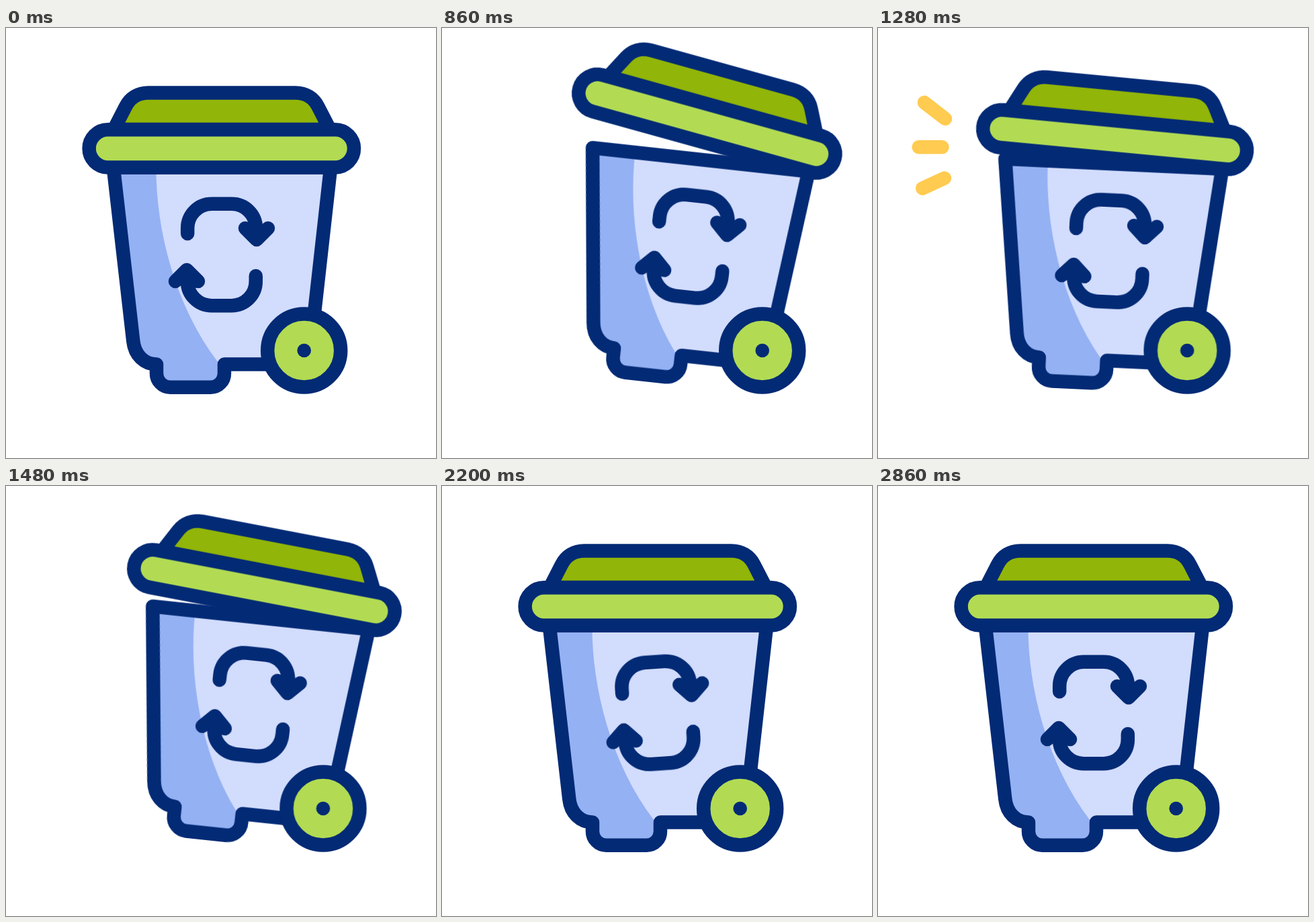
An HTML page without scripts that plays this animation: 640x640 px, repeating every 3020 ms.

```html
<!DOCTYPE html>
<html lang="en">
<head>
<meta charset="utf-8">
<title>Recycling bin</title>
<style>
  :root {
    --navy: #032a75;
    --lime: #b2db53;
    --green: #91b508;
    --pale: #d2dcfd;
    --blue: #94b1f3;
    --yellow: #ffcb50;
  }
  html, body { margin: 0; width: 100%; height: 100%; overflow: hidden; background: #fff; }
  svg { display: block; width: 100%; height: 100%; }

  .ink { stroke: var(--navy); stroke-width: 20.5; stroke-linecap: round; stroke-linejoin: round; }

  .bin, .tilt, .lid, .arrows, .spark {
    animation: 3020ms cubic-bezier(.37, 0, .63, 1) infinite;
  }
  .bin { animation-name: roll; }
  .tilt { animation-name: tilt; transform-origin: 443.7px 480px; }
  .lid { animation-name: flap; transform-origin: 484px 193px; }
  .arrows { animation-name: spin; transform-origin: 321px 337.5px; }
  .spark {
    animation-name: burst;
    stroke: var(--yellow);
    stroke-width: 20.5;
    stroke-linecap: round;
    stroke-dasharray: 1 3;
  }

  @keyframes roll {
    0%, 6.62% { transform: translateX(0); }
    18.05% { transform: translateX(-21px); }
    29.3%, 30.8% { transform: translateX(33.7px); }
    38.58% { transform: translateX(0); }
    46.36%, 47.02% { transform: translateX(33.7px); }
    54.64%, 100% { transform: translateX(0); }
  }
  @keyframes tilt {
    0%, 17.32% { transform: rotate(0deg); }
    31.82% { transform: rotate(7.1deg); }
    39.07% { transform: rotate(0deg); }
    47.02% { transform: rotate(7.1deg); }
    54.97%, 100% { transform: rotate(0deg); }
  }
  @keyframes flap {
    0%, 17.05% { transform: rotate(0deg); }
    28.97%, 30.46% { transform: rotate(9.3deg); }
    39.07% { transform: rotate(0deg); }
    46.36% { transform: rotate(6.4deg); }
    54.3%, 100% { transform: rotate(0deg); }
  }
  @keyframes spin {
    0%, 51.32% { transform: rotate(0deg); }
    95.03%, 100% { transform: rotate(360deg); }
  }
  @keyframes burst {
    0%, 39.07% { stroke-dashoffset: 1.02; }
    43.71% { stroke-dashoffset: 0; }
    48.34%, 100% { stroke-dashoffset: -1.02; }
  }
</style>
</head>
<body>
<svg viewBox="0 0 640 640" fill="none">
  <defs>
    <g id="arrow">
      <path d="M270.2 306V298A36 36 0 0 1 306.2 261.8H336A36 36 0 0 1 372 298V312"/>
      <path d="M356 298L373 315L390 298"/>
    </g>
  </defs>

  <path class="spark" pathLength="1" d="M100 135L62 105.5"/>
  <path class="spark" pathLength="1" d="M95.5 177.3H53"/>
  <path class="spark" pathLength="1" d="M99 223.5L59 242"/>

  <g class="bin">
    <g class="tilt">
      <path fill="var(--pale)" d="M159.8 207.5H483.2L455 460Q450 500.5 424 500.5H220Z"/>
      <path fill="var(--blue)" d="M223.5 207.5H159.8L189.3 466C191.5 487 206 500.5 224 500.5V514A20.5 20.5 0 0 0 244.5 534.7H304.5A20.5 20.5 0 0 0 325 514V500.5L316 498C252 415 223 300 223.5 207.5Z"/>
      <path class="ink" d="M159.8 207.5L189.3 466C191.5 487 206 500.5 224 500.5V514A20.5 20.5 0 0 0 244.5 534.7H304.5A20.5 20.5 0 0 0 325 514V500.5H424Q450 500.5 455 460L483.2 207.5Z"/>

      <g class="arrows ink">
        <use href="#arrow"/>
        <use href="#arrow" transform="rotate(180 321 337.5)"/>
      </g>

      <g class="lid ink">
        <path fill="var(--green)" d="M160.5 151L178 117C184.5 104 197 96.5 211.5 96.5H431C445.5 96.5 458 104 464.5 117L482 151Z"/>
        <rect fill="var(--lime)" x="123.6" y="151.2" width="394.4" height="56.3" rx="28.15"/>
      </g>
    </g>

    <circle class="ink" fill="var(--lime)" cx="443.7" cy="480" r="54.5"/>
    <circle fill="var(--navy)" cx="443.7" cy="480" r="10.3"/>
  </g>
</svg>
</body>
</html>
```
